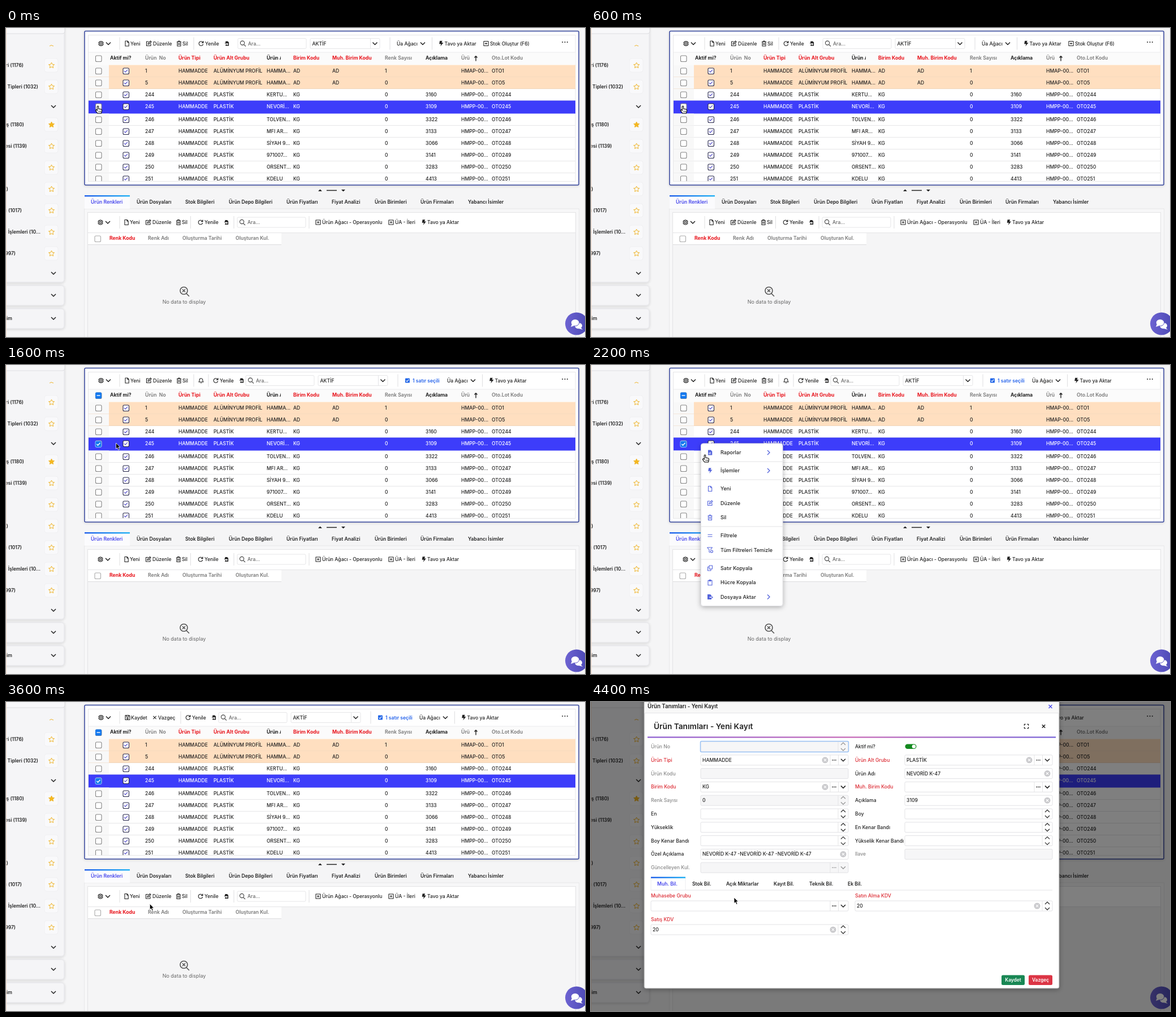
Animation of 1024 by 547 pixels, one loop 4600 ms. Source, as an HTML page:

```html
<!DOCTYPE html>
<html lang="tr">
<head>
<meta charset="utf-8">
<title>Ürün Tanımları</title>
<style>
html, body { margin: 0; width: 100%; height: 100%; overflow: hidden; background: #f5f5f6; }
svg { display: block; width: 100vw; height: 100vh; }
text { font-family: Inter, "Open Sans", sans-serif; white-space: pre; }
</style>
</head>
<body>
<svg id="stage" viewBox="0 0 1024 547"></svg>
<script>
const INK = '#222', GREY = '#777', RED = '#e8141c', BLUE = '#4444ec';
const MATERIAL = 'NEVORİD K-47', TRANSFER = 'Tavo ya Aktar';

// ---- drawing helpers ----
const text = (x, y, s, { c = INK, size = 8.6, w = 500, a = 'start' } = {}) =>
  `<text x="${x}" y="${y + size * .36}" fill="${c}" font-size="${size}" font-weight="${w}" text-anchor="${a}">${s}</text>`;
const rect = (x, y, w, h, fill, stroke = 'none', r = 0, extra = '') =>
  `<rect x="${x}" y="${y}" width="${w}" height="${h}" rx="${r}" fill="${fill}" stroke="${stroke}" ${extra}/>`;
const line = (x1, y1, x2, y2, c = '#e4e4e6', w = 1) =>
  `<path d="M${x1} ${y1}L${x2} ${y2}" stroke="${c}" stroke-width="${w}"/>`;
const sep = (x, y) => line(x, y - 11, x, y + 11, '#dedee0');

// Icons are centred on 0,0 and about ten units wide.
const strokes = {
  gear: 'M-1.7 0a1.7 1.7 0 1 0 3.4 0a1.7 1.7 0 1 0-3.4 0M-1-4h2l.5 1.3 1.4-.4 1.1 1.7-.9 1.4.9 1.4-1.1 1.7-1.4-.4L1 4h-2l-.5-1.3-1.4.4L-4 1.4-3.1 0-4-1.4l1.1-1.7 1.4.4z',
  down: 'M-4-2L0 2 4-2',
  right: 'M-2-4L2 0-2 4',
  file: 'M-3-4.5H1L3.2-2.2V4.5H-3zM1-4.5V-2H3',
  edit: 'M0-3.5H-4V4H3.5V0M-1.5 1.5L-1-.7 3-4.5 4.5-3 .6 1z',
  trash: 'M-4-3H4M-1.5-3V-4.5H1.5V-3M-3-3V4.5H3V-3M-1-1V2.5M1-1V2.5',
  refresh: 'M3.7 1A3.8 3.8 0 1 1 2.6-2.8L4-1.5M4-4.5V-1.4H1',
  search: 'M-4.5-1a3.6 3.6 0 1 0 7.2 0a3.6 3.6 0 1 0-7.2 0M1.7 1.8L5 5',
  plus: 'M-4-4H4V4H-4zM-2 0H2M0-2V2',
  bell: 'M-4 2.5Q-2.8 1.5-2.8-1A2.8 2.8 0 0 1 2.8-1Q2.8 1.5 4 2.5zM-1 4.3H1',
  save: 'M-4-4H2.6L4-2.6V4H-4zM-2-4V-1.5H2V-4M-1.2 1.6a1.2 1.2 0 1 0 2.4 0a1.2 1.2 0 1 0-2.4 0',
  cross: 'M-2.7-2.7L2.7 2.7M2.7-2.7L-2.7 2.7',
  check: 'M-3 0L-1 2.2 3-2.2',
  spin: 'M-4-3L0-7 4-3M-4 3L0 7 4 3',
  expand: 'M-4-1.5V-4H-1.5M1.5-4H4V-1.5M4 1.5V4H1.5M-1.5 4H-4V1.5',
  equal: 'M-4-1.7H4M-4 1.7H4',
  funnel: 'M-5-4.5H4L.8-.5M-5-4.5L-1.5-.5V3.5L0 4.5M1 2.5a2 2 0 1 0 4 0a2 2 0 1 0-4 0',
  copy: 'M-1.5-4.5H4V1.5H-1.5zM-1.5-2H-4V4.5H1.5V1.5',
  clip: 'M-3.5-3.5H3.5V4.7H-3.5zM-1.5-4.7H1.5V-2.5H-1.5z',
  up: 'M0 4.5V-4M-2.5-1.5L0-4.2 2.5-1.5'
};
const solids = {
  bolt: 'M-2.3-4.7H2.2L1-1.5H4L-1.2 5 0 .8H-3.3z',
  export: 'M-3-4.5H1.2L3.5-2.2V4.5H-3V2H0V3.5L2.5 1 0-1.5V0H-4.5V-1.2H-3z',
  report: 'M-3.5-4.5H1.2L3.8-2V4.5H-3.5zM-2 0V3H-1V0zM0-1V3H1V-1z',
  send: 'M-4.5-4.5H.5L2.5-2.5V0H-1V1.5H2.5V4.5H-4.5zM3-1.5L5.5.8 3 3z',
  star: 'M0-5L1.5-1.7 5-1.3 2.4 1.1 3.1 4.6 0 2.8-3.1 4.6-2.4 1.1-5-1.3-1.5-1.7z'
};
const icon = (name, x, y, c = INK, k = 1, w = 1.1) => {
  const paint = solids[name] ? `fill="${c}" fill-rule="evenodd"` : `fill="none" stroke="${c}" stroke-width="${w / k}" stroke-linejoin="round"`;
  return `<path transform="translate(${x} ${y}) scale(${k})" d="${solids[name] || strokes[name]}" ${paint}/>`;
};
const chevron = (x, y, c = INK) => icon('down', x, y, c, 1, 1.5);
const dots = (x, y, step, c = INK, r = .9) => [-1, 0, 1].map(i => `<circle cx="${x + i * step}" cy="${y}" r="${r}" fill="${c}"/>`).join('');
const box = (x, y, edge = '#858585') => rect(x - 5, y - 5, 10.5, 10.5, '#fff', edge, 2, 'stroke-width="1.1"');
const blueBox = (x, y, mark) => rect(x - 5.5, y - 5.5, 11, 11, '#1479ee', mark === 'check' ? '#8fc2ff' : 'none', 2) +
  (mark === 'check' ? icon('check', x, y, '#fff', 1, 1.4) : line(x - 3, y, x + 3, y, '#fff', 1.4));
const group = (id, body) => `<g id="${id}">${body}</g>`;

// ---- sidebar ----
function sidebar() {
  const card = (y, h) => rect(-8, y, 111, h, '#f5f5f7', '#e3e3e7', 5, 'filter="url(#soft)"');
  const items = [[66, 31, 'ri (1176)'], [104, 57, 'Tipleri (1032)'], [171, 32, 'iş (1180)'], [209, 37, 'esi (1139)'], [247, 0, ''],
    [285, 4, ')'], [323, 28, 'ı (1017)'], [361, 61, 'e İşlemleri (10...'], [399, 17, '997)']];
  let s = card(-10, 460) + card(456, 35) + card(497, 35) + rect(-8, -20, 112, 30, '#f8f8fa', '#dcdce0', 4);
  s += line(77, 32, 80, 30.5, '#f0b429') + line(80, 30.5, 84, 32, '#f0b429');
  for (const [y, end, label] of items) {
    s += text(end, y, label, { size: 8.5, w: 600, a: 'end' }) + rect(68, y - 12, 24, 24, '#f9f9fb', '#f0f0f2', 4);
    s += `<path transform="translate(80.5 ${y})" d="${solids.star}" fill="${y === 171 ? '#f5b91f' : 'none'}" stroke="#f0b429"/>`;
  }
  for (const y of [139, 434, 473, 514]) s += chevron(84, y);
  return s + text(11, 514, 'tim', { size: 8.5, w: 600, a: 'end' }) + line(.5, 0, .5, 547, '#fbe3d2');
}

// ---- toolbars ----
const label = (name, x, tx, y, s) => icon(name, x, y) + text(tx, y, s);
const menuButton = (x, y) => icon('gear', x, y) + chevron(x + 13, y);
const crud = (x, y) => label('file', x, x + 6, y, 'Yeni') + label('edit', x + 38.5, x + 46, y, 'Düzenle') + label('trash', x + 92, x + 98, y, 'Sil');
const searchBox = (x, y) => rect(x, y - 9, 121, 18, '#fff', '#e6e6e8', 2) + icon('search', x + 9, y, '#444') + text(x + 18, y, 'Ara...', { c: '#666' });
const reload = (x, y) => label('refresh', x, x + 7, y, 'Yenile') + icon('export', x + 46, y, INK, .9);

function gridBar(mode) {
  const y = 27.5;
  const [refreshX, searchX, treeX] = { idle: [345, 410, 691], picked: [371, 424, 780], edit: [322, 376, 731] }[mode];
  let s = menuButton(168, y) + sep(201, y);
  s += mode === 'edit' ? label('save', 215, 221, y, 'Kaydet') + label('cross', 263, 269, y, 'Vazgeç') : crud(214, y);
  if (mode === 'picked') s += sep(332, y) + icon('bell', 345, y);
  s += sep(refreshX - 13, y) + searchBox(searchX, y) + reload(refreshX, y);
  s += rect(searchX + 128, y - 9, 123, 18, '#fff', '#e6e6e8', 2) + text(searchX + 131.5, y, 'AKTİF');
  s += line(searchX + 234.5, y - 9, searchX + 234.5, y + 9) + chevron(searchX + 242.5, y) + sep(searchX + 269, y);
  if (mode !== 'idle') {
    const x = searchX + 286;
    s += rect(x - 4, y - 4, 8, 8, '#2468e8', 'none', 1) + icon('check', x, y, '#fff', .8);
    s += text(x + 9, y, '1 satır seçili', { c: '#2563eb', w: 600 });
  }
  s += text(treeX, y, 'Üa Ağacı') + chevron(treeX + 46, y) + sep(treeX + 62.5, y) + label('bolt', treeX + 78.5, treeX + 84.5, y, TRANSFER);
  return s + (mode === 'idle' ? label('plus', 849, 856, y, 'Stok Oluştur (F6)') : '');
}

// ---- upper grid ----
const HEADS = [[184, 'Aktif mi?', INK], [246, 'Ürün  No', GREY], [305, 'Ürün Tipi', RED], [367, 'Ürün Alt Grubu', RED], [508, 'Birim Kodu', RED],
  [577, 'Muh. Birim Kodu', RED], [670, 'Renk Sayısı', GREY], [742, 'Açıklama', INK], [805, 'Ürü', GREY], [859, 'Oto.Lot Kodu', GREY]];
const ROWS = ['1|HAMMA...|', '5|HAMMA...|', '244|KERTU...|3160', `245|${MATERIAL.slice(0, 6)}...|3109`, '246|TOLVEN...|3322', '247|MFI AR...|3133',
  '248|SİYAH 9...|3066', '249|971007...|3141', '250|ORSENT...|3283', '251|KDELU|4413'];
const rowY = i => 76 + 21 * i + (i > 3 ? 2 : 0);

function grid() {
  let s = rect(139, 5.5, 874, 272.5, '#fff', '#34469c', 2, 'stroke-width="1.5" filter="url(#soft)"');
  s += rect(145.5, 12.5, 861.5, 259, '#fff', '#e6e6e8') + rect(146, 43, 861, 22, '#fbfbfb') + line(146, 43, 1007, 43, '#ececee');
  s += dots(988.5, 25, 4.3, '#333', 1.1);
  for (const [x, name, c] of HEADS) s += text(x, 52.5, name, { c, w: c === GREY ? 600 : 700, size: 8.7 });
  s += `<g clip-path="url(#nameCell)">${text(461, 52.5, 'Ürün Adı', { w: 700, size: 8.7 })}</g>` + icon('up', 831, 54, INK, 1, 1.4);
  s += box(163.5, 54) + '<g clip-path="url(#rows)">';
  ROWS.forEach((row, i) => {
    const [no, name, note] = row.split('|'), y = rowY(i), top = i < 2, on = i === 3, o = { c: on ? '#fff' : INK };
    const cells = [[246, no], [305, 'HAMMADDE'], [367, top ? 'ALÜMİNYUM PROFİL' : 'PLASTİK'], [461, name], [508, top ? 'AD' : 'KG'], [577, top ? 'AD' : ''],
      [670, i ? 0 : 1], [742, note], [805, top ? 'HMAP-00...' : 'HMPP-00...'], [859, 'OTO' + no]];
    s += rect(146, y - 10.5, 36, 21, '#f8f8f8');
    if (top) s += rect(182, y - 10.5, 825, 21, '#ffdfc0');
    s += line(146, y + 10.5, 1007, y + 10.5, top ? '#f0d6bd' : '#e6e6e8');
    if (on) s += rect(146, 128.5, 861, 23, '#3d3dfa');
    s += box(163.5, y) + box(212, y, '#25254a') + icon('check', 212, y, '#4a43c8');
    s += cells.map(([x, v]) => text(x, y, v, o)).join('');
  });
  return s + '</g>';
}

// ---- lower panel ----
function tabs(list, y, size) {
  return list.map(([x, s], i) => text(x, y, s, { c: i ? INK : BLUE, w: 600, size })).join('');
}
function lower() {
  const y = 344;
  let s = '<path d="M552 289h7l-3.5-3.5zM593 286h7l-3.5 3.5z" fill="#222"/>' + line(567, 287.5, 585, 287.5, INK, 1.5);
  s += rect(138.5, 320, 875, 240, '#f7f7f8', '#e8e8ea') + rect(139, 296, 80, 24, '#fbfbfd') + rect(139, 296, 80, 2.5, 'url(#bar)');
  s += tabs([[150, 'Ürün Renkleri'], [231, 'Ürün Dosyaları'], [317, 'Stok Bilgileri'], [394, 'Ürün Depo Bilgileri'], [496, 'Ürün Fiyatları'],
    [576, 'Fiyat Analizi'], [652, 'Ürün Birimleri'], [733, 'Ürün Firmaları'], [817, 'Yabancı İsimler']], 308, 8.6);
  s += rect(144.5, 326.5, 863, 240, '#f5f5f6', '#e3e3e5') + rect(145, 327, 862, 35.5, '#fff') + line(145, 362.5, 1007, 362.5);
  s += rect(145, 363, 342, 20.5, '#fff') + line(145, 383.5, 487, 383.5, '#dcdcde');
  s += menuButton(167, y) + sep(201, y) + crud(213, y) + sep(326.5, y) + reload(344, y) + sep(403, y) + searchBox(409, y) + sep(536, y);
  s += label('plus', 552, 559, y, 'Ürün Ağacı - Operasyonlu') + label('plus', 681, 688, y, 'ÜA - İleri') + label('bolt', 739, 745, y, TRANSFER);
  s += box(162, 373, '#aaa');
  for (const [x, name] of [[183, 'Renk Kodu'], [251, 'Renk Adı'], [312, 'Oluşturma Tarihi'], [406, 'Oluşturan Kul.']])
    s += text(x, 371.5, name, { c: x === 183 ? RED : GREY, w: x === 183 ? 700 : 600, size: 8.7 });
  s += '<g fill="none" stroke="#555" stroke-width="1.6"><circle cx="314.5" cy="465" r="6.5"/><path d="M319 470l5 5M312 462.500l5 5M317 462.500l-5 5"/></g>';
  return s + text(315, 485, 'No data to display', { c: '#666', size: 9, w: 400, a: 'middle' });
}
const chat = () => '<circle cx="1009" cy="523.500" r="20" fill="url(#chat)"/><g fill="#fff">' +
  '<ellipse cx="1012.500" cy="527" rx="6.500" ry="5.200"/><path d="M1016 530l4 4-7-2z"/>' +
  '<ellipse cx="1006.500" cy="521.500" rx="7.300" ry="6" stroke="#5a54c4"/><path d="M1001 524l-2 5 6-2z"/></g>';

// ---- context menu ----
function menu() {
  const items = [[155, 'report', 'Raporlar', 1], [187, 'bolt', 'İşlemler', 1], [219, 'file', 'Yeni'], [244.5, 'edit', 'Düzenle'], [270, 'trash', 'Sil'],
    [302, 'equal', 'Filtrele'], [327.5, 'funnel', 'Tüm Filtreleri Temizle'], [359.5, 'copy', 'Satır Kopyala'], [385, 'clip', 'Hücre Kopyala'], [410.5, 'send', 'Dosyaya Aktar', 1]];
  let s = rect(194.5, 139, 144.5, 287.5, '#fff', '#e2e2e6', 4, 'filter="url(#deep)"');
  for (const y of [171, 203, 286, 344]) s += line(195, y, 339, y, '#e2e2e4');
  for (const [y, name, str, more] of items)
    s += icon(name, 210.5, y, '#5565dc') + text(229, y, str, { size: 9 }) + (more ? icon('right', 314, y, '#5565dc', 1, 1.4) : '');
  return s;
}

// ---- record dialog ----
// kinds: s spinner, l lookup, c clear button, d disabled
function field(x, y, w, value, kind) {
  const end = x + w, off = kind.includes('d'), c = off ? '#999' : INK, split = dx => line(end - dx, y - 9, end - dx, y + 9);
  let s = rect(x, y - 9, w, 18, off ? '#f6f6f7' : '#fff', '#e2e2e5', 2) + text(x + 3, y, value), clearX = end - 9;
  if (kind.includes('s')) { s += split(18) + icon('spin', end - 9, y, off ? '#999' : '#333', 1, 1.3); clearX -= 18; }
  if (kind.includes('l')) { s += split(32) + split(17.5) + dots(end - 25, y, 2.8, c) + chevron(end - 9, y, c); clearX -= 32; }
  if (kind.includes('c')) s += `<circle cx="${clearX}" cy="${y}" r="5.5" fill="#c9c9cc"/>` + icon('cross', clearX, y, '#fff', .85);
  return s;
}
const LEFT = ['Ürün No|g||ds', 'Ürün Tipi|r|HAMMADDE|lc', 'Ürün Kodu|g||d', 'Birim Kodu|r|KG|lc', 'Renk Sayısı|g|0|ds', 'En|k||s', 'Yükseklik|k||s', 'Boy Kenar Bandı|k||s',
  `Özel Açıklama|k|${MATERIAL} -${MATERIAL} -${MATERIAL}|c`, 'Güncelleyen Kul.|g||dl'];
const RIGHT = ['Aktif mi?|k||', 'Ürün Alt Grubu|r|PLASTİK|lc', `Ürün Adı|k|${MATERIAL}|c`, 'Muh. Birim Kodu|r||l', 'Açıklama|k|3109|c', 'Boy|k||s', 'En Kenar Bandı|k||s',
  'Yükselik Kenar Bandı|k||s', 'Ilave|g||d'];

function dialog() {
  const tint = { g: '#888', r: '#dc2a32', k: INK }, red = { c: tint.r };
  let s = rect(0, 0, 1024, 547, '#000', 'none', 0, 'opacity=".5"') + rect(94, -10, 734, 517, '#fff', '#999', 3, 'filter="url(#deep)"');
  s += rect(94.5, 0, 733, 19, '#f8f8f8') + line(94, 19.5, 828, 19.5) + text(100, 8, 'Ürün Tanımları - Yeni Kayıt', { size: 9.7, w: 600 });
  s += icon('cross', 812.5, 8, BLUE, 1.1, 1.3) + text(111, 43.5, 'Ürün Tanımları - Yeni Kayıt', { size: 13.7, w: 600 });
  s += icon('expand', 770, 43, INK, .9, 1.3) + icon('cross', 800.5, 43, INK, 1, 1.5) + rect(100, 61.3, 722, 2.2, 'url(#rule)');
  [[LEFT, 106, 194], [RIGHT, 467, 555]].forEach(([list, lx, fx]) => list.forEach((spec, i) => {
    const [name, c, value, kind] = spec.split('|'), y = 79 + i * 23.8;
    s += text(lx, y, name, { c: tint[c] });
    if (name !== 'Aktif mi?') s += field(fx, y, 261, value, kind);
  }));
  s += rect(193.5, 69.5, 262, 19, 'none', '#9cc3f5', 2, 'stroke-width="1.5"');
  s += rect(555.5, 74.5, 20, 8.5, '#13891f', 'none', 4.2) + '<circle cx="571" cy="78.700" r="3.300" fill="#fff"/>';
  s += line(106, 333, 816, 333) + rect(106, 310, 61, 23, '#fff', '#ececf0') + rect(106, 309.5, 61, 2.5, 'url(#bar)');
  s += tabs([[117, 'Muh. Bil.'], [179, 'Stok Bil.'], [239, 'Açık Miktarlar'], [323, 'Kayıt Bil.'], [386, 'Teknik Bil.'], [454, 'Ek Bil.']], 322, 8.6);
  s += text(106, 343, 'Muhasebe Grubu', red) + field(106, 361, 349, '', 'l');
  s += text(467, 343, 'Satın Alma KDV', red) + field(467, 361, 349, '20', 'sc');
  s += text(106, 385, 'Satış KDV', red) + field(106, 403, 349, '20', 'sc');
  const button = (x, w, c, str) => rect(x, 483.5, w, 17.5, c, 'none', 2.5) + text(x + w / 2, 492.3, str, { c: '#fff', w: 600, size: 8.4, a: 'middle' });
  return s + button(726, 41, '#198754', 'Kaydet') + button(774, 42, '#dc3545', 'Vazgeç');
}

// ---- pointers, hot spot on 0,0 ----
const POINTERS = {
  arrow: '<path d="M0 0V10.500L2.400 8.300 4.100 12.300 6 11.500 4.300 7.600H7.500z" fill="#000" stroke="#fff" stroke-width=".8"/>',
  hand: '<path d="M-1.200 1Q0-1 1.200 1V5L6 6Q7.500 6.500 7 9L6 13H-.5L-4 8.500Q-4-6.800-2.500 7L-1.200 8z" transform="translate(0 0)" fill="#fff" stroke="#000" stroke-width="1.100"/>'.replace('Q-4-6.800-2.500 7', 'Q-4.200 6.400-2.500 7') +
    '<path d="M1.500 8.500V11M3.300 8.500V11M5 8.500V11" stroke="#000" stroke-width=".7"/>',
  beam: '<path d="M-2.500-5.500Q0-5.500 0-4V4.500Q0 6-2.500 6M2.500-5.500Q0-5.500 0-4M0 4.500Q0 6 2.500 6M-1.300 .5H1.300" fill="none" stroke="#222" stroke-width="1.100"/>'
};

const gradient = (id, ...colors) => `<linearGradient id="${id}">${colors.map((c, i) => `<stop offset="${i / (colors.length - 1)}" stop-color="${c}"/>`).join('')}</linearGradient>`;
const shadow = (id, dy, blur, alpha) => `<filter id="${id}" x="-20%" y="-20%" width="140%" height="140%"><feDropShadow dx="0" dy="${dy}" stdDeviation="${blur}" flood-opacity="${alpha}"/></filter>`;
const stage = document.getElementById('stage');
stage.innerHTML = '<defs>' + gradient('bar', '#2563eb', '#27b4f5') + gradient('rule', '#8a5bd0', '#c565b5', '#7460d6') + gradient('chat', '#6d63d2', '#4b49b4') +
  shadow('soft', 1, 2, .16) + shadow('deep', 2, 4, .3) +
  '<clipPath id="rows"><path d="M145 65H1007V271H145z"/></clipPath><clipPath id="nameCell"><path d="M460 44H486V64H460z"/></clipPath></defs>' +
  rect(0, 0, 1024, 547, '#f5f5f6') + sidebar() + grid() + ['idle', 'picked', 'edit'].map(m => group(m, gridBar(m))).join('') +
  group('marks', blueBox(163.5, 54, 'dash') + blueBox(163.5, 140, 'check')) + lower() + chat() +
  group('menu', menu()) + group('dialog', dialog()) + Object.keys(POINTERS).map(k => group(k, POINTERS[k])).join('');

// ---- timing ----
const LOOP = 4600, STEP = 200, PICK = 1200, MENU = 1800, EDIT = 3400, DIALOG = 3800;
const PATH = [[0, 162.5, 138, 'hand'], [1200, 162.5, 138, 'hand'], [1400, 182, 138, 'arrow'], [1600, 194.5, 138, 'arrow'], [1800, 194.5, 138, 'arrow'],
  [2000, 198, 148, 'hand'], [2200, 201.5, 159, 'hand'], [3000, 253, 355, 'hand'], [3400, 254, 357, 'arrow'], [3800, 254.5, 357.5, 'beam'],
  [4000, 254.5, 357.5, 'beam'], [4200, 253.5, 348, 'arrow'], [4400, 253, 346, 'arrow'], [LOOP, 253, 346, 'arrow']];
const show = (id, on) => { document.getElementById(id).style.display = on ? '' : 'none'; };

function render(ms) {
  const t = Math.floor(ms % LOOP / STEP) * STEP;
  show('idle', t < PICK);
  show('picked', t >= PICK && t < EDIT);
  show('edit', t >= EDIT);
  show('marks', t >= PICK);
  show('menu', t >= MENU && t < EDIT);
  show('dialog', t >= DIALOG);
  const i = PATH.findIndex((key, n) => t >= key[0] && t < PATH[n + 1][0]);
  const [t0, x0, y0, kind] = PATH[i], [t1, x1, y1] = PATH[i + 1];
  const u = (t - t0) / (t1 - t0), e = u * u * (3 - 2 * u);
  for (const k in POINTERS) show(k, k === kind);
  document.getElementById(kind).setAttribute('transform', `translate(${x0 + (x1 - x0) * e} ${y0 + (y1 - y0) * e})`);
}

const start = performance.now();
function tick() {
  render(performance.now() - start);
  requestAnimationFrame(tick);
}
tick();
</script>
</body>
</html>
```
